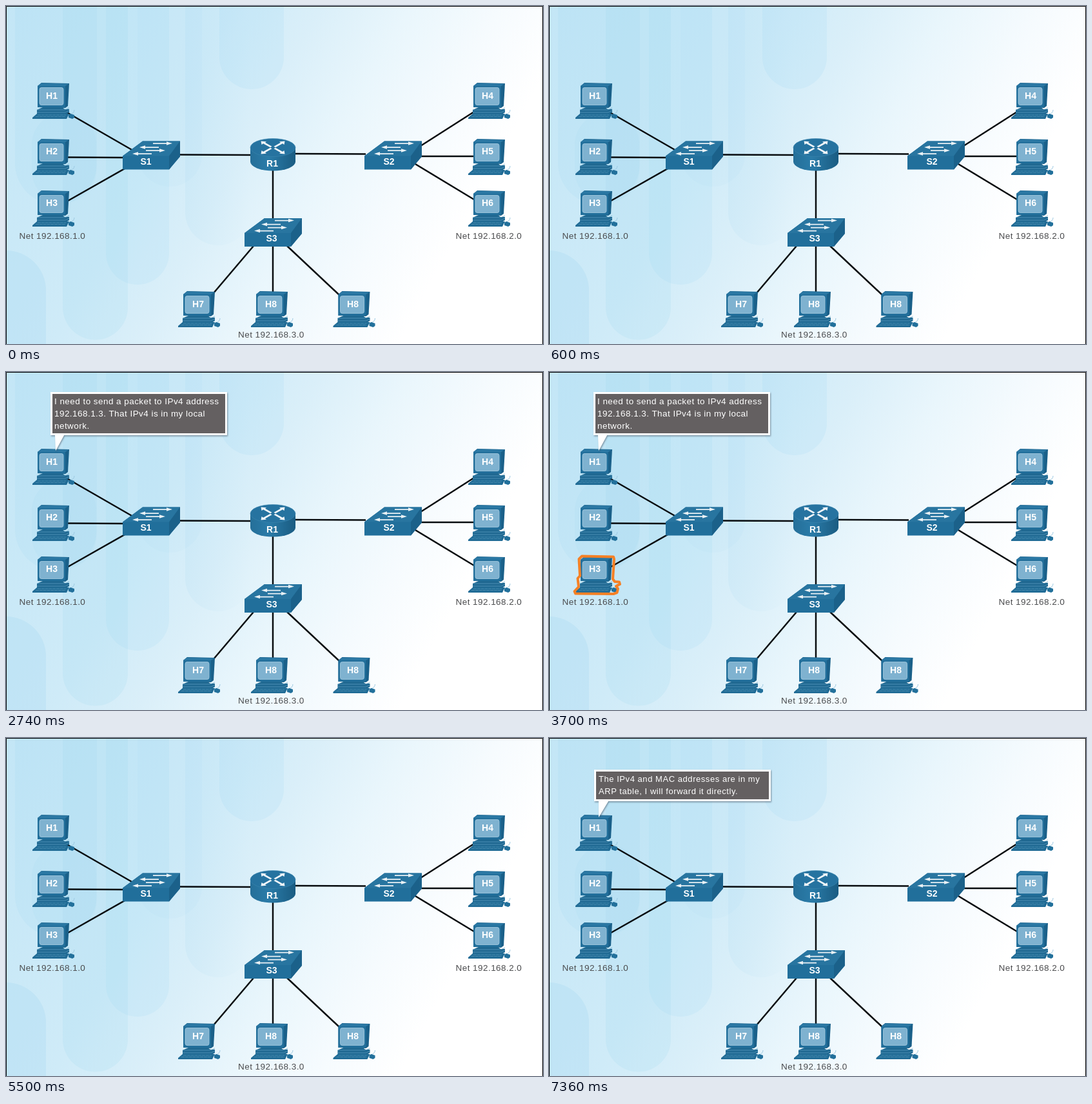
An HTML page that plays this animation: 833 by 524 pixels, repeating every 8 s.

```html
<!DOCTYPE html>
<html lang="en">
<head>
<meta charset="utf-8">
<title>Local network forwarding</title>
<style>
html, body { margin: 0; width: 100%; height: 100%; overflow: hidden; background: #fff; }
svg { display: block; width: 100%; height: 100%; }
text { font-family: "Liberation Sans", Arial, sans-serif; }
.label { font-size: 14px; font-weight: bold; fill: #fff; text-anchor: middle; }
.net { font-size: 13.5px; letter-spacing: .45px; fill: #4b4c4e; }
.say { font-size: 13.5px; letter-spacing: .45px; fill: #fff; }
.say.tight { font-size: 13px; letter-spacing: .55px; }
.links { stroke: #080c0f; stroke-width: 2.5; fill: none; }
.cue { opacity: 0; animation: 8s step-end infinite; }
.tab { animation-name: tab; }
.need { animation-name: need; }
.glow { animation-name: glow; }
.forward { animation-name: forward; }
@keyframes tab { 0% { opacity: 0 } 6.25% { opacity: 1 } 7.5%, 100% { opacity: 0 } }
@keyframes need { 0% { opacity: 0 } 16.25% { opacity: 1 } 68.75%, 100% { opacity: 0 } }
@keyframes glow { 0% { opacity: 0 } 46.25% { opacity: 1 } 68.75%, 100% { opacity: 0 } }
@keyframes forward { 0% { opacity: 0 } 80%, 100% { opacity: 1 } }
</style>
</head>
<body>
<svg viewBox="0 0 833 524" preserveAspectRatio="none">
  <defs>
    <linearGradient id="sky" gradientUnits="userSpaceOnUse" x1="0" y1="0" x2="690" y2="373">
      <stop offset="0" stop-color="#c3e6f6"/>
      <stop offset=".4" stop-color="#cfebf8"/>
      <stop offset=".55" stop-color="#daeff9"/>
      <stop offset=".7" stop-color="#e9f6fc"/>
      <stop offset=".86" stop-color="#f6fbfe"/>
      <stop offset="1" stop-color="#fff"/>
    </linearGradient>
    <linearGradient id="band" gradientUnits="userSpaceOnUse" x1="270" y1="0" x2="380" y2="0">
      <stop offset="0" stop-color="#8fcdec"/>
      <stop offset="1" stop-color="#8fcdec" stop-opacity="0"/>
    </linearGradient>
    <linearGradient id="drum">
      <stop offset="0" stop-color="#256f99"/>
      <stop offset=".4" stop-color="#2a7ba8"/>
      <stop offset="1" stop-color="#1a5c82"/>
    </linearGradient>
    <filter id="shadow" x="-10%" y="-20%" width="120%" height="150%">
      <feDropShadow dx="1" dy="1.5" stdDeviation="1.2" flood-color="#456" flood-opacity=".6"/>
    </filter>

    <g id="host">
      <path d="M56 50Q65 48 65 42" fill="none" stroke="#9cc9e2"/>
      <path d="M8 5 14 0 57 1 55 36 51 39 8 38Z" fill="#1a6089"/>
      <path d="M8 5H51V38H8Z" fill="#226f9b"/>
      <path d="M8 5 14 .5 56.500 1.500 51 5Z" fill="#2b78a4"/>
      <rect x="11" y="7.500" width="37" height="27" rx="3" fill="#7fb2d0" stroke="#a9cde1" stroke-width=".8"/>
      <path d="M16 38H46L50 41H57V46L52 49H7V42Z" fill="#1f6891"/>
      <path d="M7 42H51L57 39M7 46H51L57 43" fill="none" stroke="#5f9fc2" stroke-width=".7"/>
      <path d="M7 48H57L53 56H0V54Z" fill="#216c96"/>
      <path d="M8 50H52M5 52.500H51" stroke="#5c9abd" stroke-width=".6" stroke-dasharray="5 .8"/>
      <path d="M56 50 59 48 65 50V54L62 56 56 54Z" fill="#22709b"/>
    </g>

    <path id="arrow" d="M0 2.800H21V.8L30 3.500 21 6.200V4.400H0Z" fill="#e9f1f5"/>
    <g id="switch">
      <path d="M0 23 31 0H89V23L72 44H0Z" fill="#216f9b"/>
      <path d="M0 23 31 0H89L72 23Z" fill="#2875a0"/>
      <path d="M72 23 89 0V24L72 44Z" fill="#1b618a"/>
      <use href="#arrow" x="47" y="0"/>
      <use href="#arrow" transform="translate(56 6)scale(-1 1)"/>
      <use href="#arrow" x="36" y="11"/>
      <use href="#arrow" transform="translate(45 16)scale(-1 1)"/>
    </g>

    <path id="barb" d="M-.6-.8 10-6.800 8-8.200 16.500-9 15.500-3.600 13-5.200 2 .8Z" fill="#f1f6f9"/>
    <g id="router">
      <path d="M-35 0V22A35 14 0 0 0 35 22V0Z" fill="url(#drum)"/>
      <ellipse rx="35" ry="14" fill="#2673a0" stroke="#3d86af" stroke-width=".6"/>
      <use href="#barb" x="2" y="-1"/>
      <use href="#barb" transform="translate(-2 -1)scale(-1 1)"/>
      <use href="#barb" transform="translate(2 1)scale(1 -1)"/>
      <use href="#barb" transform="translate(-2 1)scale(-1 -1)"/>
    </g>
  </defs>

  <rect width="833" height="524" fill="url(#sky)"/>
  <g fill="#8fcdec">
    <path d="M331 0H431V79A50 50 0 0 1 331 79Z" opacity=".14"/>
    <path d="M278 0H380V320A51 51 0 0 1 278 320Z" fill="url(#band)" opacity=".12"/>
    <path d="M204 0H304V230A50 50 0 0 1 204 230Z" opacity=".06"/>
    <path d="M155 0H253V383A49 49 0 0 1 155 383Z" opacity=".13"/>
    <path d="M88 0H189V467A50.500 50.500 0 0 1 88 467Z" opacity=".15"/>
    <path d="M14 0H141V244A63.500 63.500 0 0 1 14 244Z" opacity=".12"/>
    <path d="M40 215A50 50 0 0 1 140 215V255A50 50 0 0 1 40 255Z" opacity=".1"/>
    <path d="M0 379A62 62 0 0 1 62 441V524H0Z" opacity=".2"/>
  </g>

  <path class="links" d="M91 163 197 224M95 234.500 183 235M96 302 186 251M268 230.500 382 231M448 229 558 229.500M414 252V333M643 217 726 164M640 233H726M630 242 726 300M384 372 322 445M414 372V444M436 372 517 448"/>

  <use href="#host" x="41" y="119"/>
  <use href="#host" x="41" y="206"/>
  <use href="#host" x="41" y="286"/>
  <use href="#host" x="717" y="119"/>
  <use href="#host" x="717" y="206"/>
  <use href="#host" x="717" y="286"/>
  <use href="#host" x="267" y="442"/>
  <use href="#host" x="380" y="442"/>
  <use href="#host" x="507.500" y="442"/>
  <use href="#switch" x="181" y="209.500"/>
  <use href="#switch" x="556" y="209.500"/>
  <use href="#switch" x="370" y="329"/>
  <use href="#router" x="414" y="219.500"/>

  <g class="label">
    <text x="71" y="144">H1</text>
    <text x="71" y="230">H2</text>
    <text x="71" y="310">H3</text>
    <text x="747" y="144">H4</text>
    <text x="747" y="230">H5</text>
    <text x="747" y="310">H6</text>
    <text x="298" y="467">H7</text>
    <text x="411" y="467">H8</text>
    <text x="538" y="467">H8</text>
    <text x="217" y="246">S1</text>
    <text x="594" y="246">S2</text>
    <text x="412" y="365">S3</text>
    <text x="413" y="249">R1</text>
  </g>
  <g class="net">
    <text x="20.500" y="361">Net 192.168.1.0</text>
    <text x="697.500" y="361">Net 192.168.2.0</text>
    <text x="360" y="514">Net 192.168.3.0</text>
  </g>

  <rect class="cue tab" x="169.500" y="514.500" width="44" height="20" rx="5" fill="#e3f1f8" stroke="#b4c4cd"/>

  <g class="cue need">
    <path d="M69 31H343V98H90L77 122 76 98H69Z" fill="#fff" filter="url(#shadow)"/>
    <rect x="72" y="34" width="268" height="61" fill="#646061"/>
    <g class="say">
      <text x="75" y="50">I need to send a packet to IPv4 address</text>
      <text x="75" y="69">192.168.1.3. That IPv4 is in my local</text>
      <text x="75" y="88">network.</text>
    </g>
  </g>

  <path class="cue glow" d="M51 285.500 100 286.500 101 290 99 321 102 325 109 325.500 110 329 104 332 107 336 105.500 342 100 344 41 343.500 39.500 340 46 333 44.500 320 48 316 46.500 290Z" fill="none" stroke="#f58025" stroke-width="4" stroke-linejoin="round"/>

  <g class="cue forward">
    <path d="M70 49H344V98H92L77 123V98H70Z" fill="#fff" filter="url(#shadow)"/>
    <rect x="73" y="52" width="268" height="43" fill="#646061"/>
    <g class="say tight">
      <text x="77" y="68">The IPv4 and MAC addresses are in my</text>
      <text x="77" y="87">ARP table, I will forward it directly.</text>
    </g>
  </g>

  <path d="M.5 524V.5H832.500V524" fill="none" stroke="#000"/>
</svg>
</body>
</html>
```
